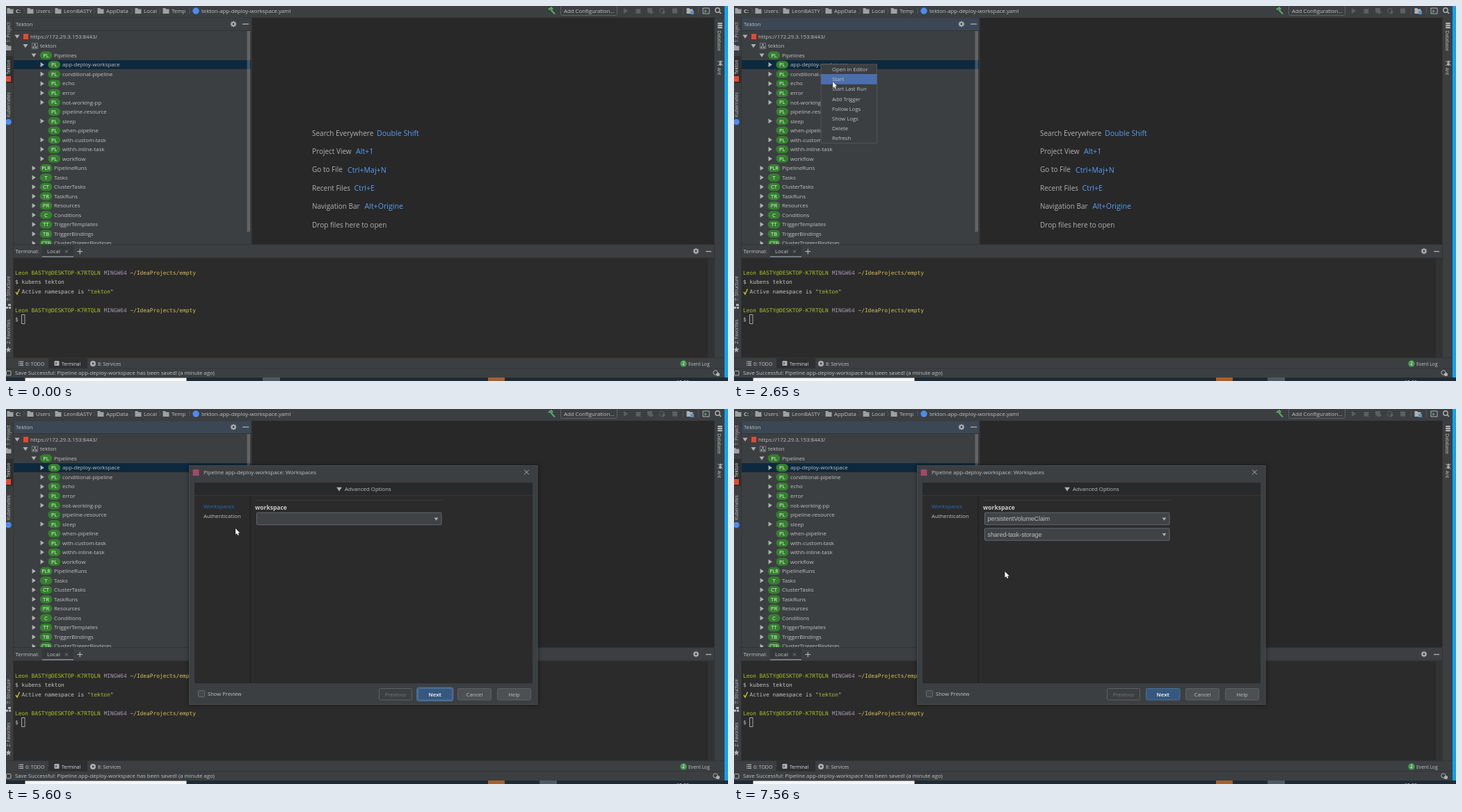
An HTML page with a canvas for the animation above (8 s loop, 1038 px wide and 540 px high).

```html
<!DOCTYPE html>
<html lang="en">
<head>
<meta charset="utf-8">
<title>Starting a pipeline with a workspace</title>
<style>
html, body { margin: 0; width: 100%; height: 100%; overflow: hidden; background: #282828; }
canvas { display: block; }
</style>
</head>
<body>
<canvas id="stage" width="1038" height="540"></canvas>
<script>
const g = document.getElementById('stage').getContext('2d');
const UI = '"Open Sans", "Noto Sans", sans-serif';
const ARIAL = '"Liberation Sans", Arial, sans-serif';
const MONO = '"DejaVu Sans Mono", monospace';
const PANEL = '#3c3f41', DARK = '#2b2b2b', FG = '#c0c0c0', ICON = '#afb1b3', DIM = '#5d6062';
const BLUE = '#4b6eaf', LINK = '#589df6', EDGE = '#323232';
const PROMPT_USER = 'Leon BASTY@DESKTOP-K7RTQLN';
const LOOP = 8000;

// ---- drawing helpers ----
function rect(x, y, w, h, fill, r = 0, stroke, lw = 1) {
  g.beginPath();
  g.roundRect(x, y, w, h, r);
  if (fill) { g.fillStyle = fill; g.fill(); }
  if (stroke) { g.strokeStyle = stroke; g.lineWidth = lw; g.stroke(); }
}
// y is the middle of the line of text
function text(s, x, y, color = FG, size = 7.85, font = UI, align = 'left', weight = '') {
  g.font = `${weight} ${size}px ${font}`;
  g.textAlign = align;
  g.fillStyle = color;
  g.fillText(s, x, y + size * 0.36);
}
function trace(points) {
  g.beginPath();
  for (let i = 0; i < points.length; i += 2) g.lineTo(points[i], points[i + 1]);
}
function line(points, color = ICON, width = 1) {
  trace(points);
  g.strokeStyle = color;
  g.lineWidth = width;
  g.stroke();
}
function poly(points, color = ICON) {
  trace(points);
  g.fillStyle = color;
  g.fill();
}
function disc(x, y, r, color) {
  g.beginPath();
  g.arc(x, y, r, 0, 7);
  g.fillStyle = color;
  g.fill();
}
function ring(x, y, r, color = ICON, width = 1) {
  g.beginPath();
  g.arc(x, y, r, 0, 7);
  g.strokeStyle = color;
  g.lineWidth = width;
  g.stroke();
}
function vertical(s, x, y, turn, color = FG) {
  g.save();
  g.translate(x, y);
  g.rotate(turn * Math.PI / 2);
  text(s, 0, 0, color, 6.7, UI, 'center');
  g.restore();
}
const down = (x, y, w = 3.5, color = ICON) => poly([x - w, y - w * 0.7, x + w, y - w * 0.7, x, y + w * 0.8], color);
const right = (x, y, w = 3.5, color = ICON) => poly([x - w * 0.7, y - w, x - w * 0.7, y + w, x + w * 0.8, y], color);
const folder = (x, y, color = '#9da2a6') => poly([x - 4.5, y - 4, x - 1, y - 4, x + 0.5, y - 2.5, x + 4.5, y - 2.5, x + 4.5, y + 4, x - 4.5, y + 4], color);
function gear(x, y) {
  for (let i = 0; i < 4; i++) {
    const c = Math.cos(i * Math.PI / 4) * 4.3, s = Math.sin(i * Math.PI / 4) * 4.3;
    line([x - c, y - s, x + c, y + s], ICON, 1.6);
  }
  disc(x, y, 3.2, ICON);
  disc(x, y, 1.4, PANEL);
}
function cross(x, y, r, color = ICON) {
  line([x - r, y - r, x + r, y + r], color);
  line([x - r, y + r, x + r, y - r], color);
}

// ---- window parts ----
function topBar() {
  rect(0, 0, 1033, 16.5, PANEL);
  folder(6, 7);
  text('C:', 14, 7, FG, 7.8, UI, 'left', 'bold');
  [[35, 43, 'Users'], [75, 83, 'LeonBASTY'], [136, 144, 'AppData'], [190, 198, 'Local'], [230, 238, 'Temp']]
    .forEach(([iconX, x, name]) => {
      line([iconX - 10, 3, iconX - 8, 7, iconX - 10, 11], '#55585a');
      folder(iconX, 7);
      text(name, x, 7);
    });
  line([263, 3, 265, 7, 263, 11], '#55585a');
  disc(273, 7, 4.7, '#4b8cf0');
  text('tekton-app-deploy-workspace.yaml', 281, 7);

  line([780, 5, 784, 2.5, 786, 5], '#59a869', 2.4);
  line([783, 5, 789, 11.5], '#59a869', 2);
  rect(797.5, -1, 81, 14.5, null, 2, '#5e6060');
  text('Add Configuration...', 802, 7);
  right(891, 7, 4, DIM);
  disc(909, 7.5, 3.4, DIM);
  line([905, 4, 913, 11], DIM);
  line([913, 4, 905, 11], DIM);
  poly([922, 3, 929, 3, 929, 8, 925.5, 11, 922, 8], DIM);
  right(929, 9, 3, DIM);
  ring(943, 7, 3.5, DIM);
  right(946, 9, 3, DIM);
  rect(958, 3.5, 7, 7, DIM);
  line([973.5, 2, 973.5, 12], '#515456');
  line([995.5, 2, 995.5, 12], '#515456');
  folder(983, 7, ICON);
  rect(984, 7, 5, 5, '#5a8fc0');
  rect(1002, 3, 9, 8, null, 0, ICON);
  right(1006, 7.5, 2.3, '#59a869');
  ring(1023, 6, 3.2, ICON, 1.4);
  line([1025.3, 8.3, 1028, 11], ICON, 1.6);
}

function sideBars() {
  rect(0, 17, 10, 490, PANEL);
  rect(0, 72, 10, 39, '#2d2f30');
  rect(10, 17, 1, 490, EDGE);
  vertical('1: Project', 4, 38, -1);
  folder(3, 60);
  vertical('Tekton', 4, 88, -1, '#dddddd');
  rect(0, 101, 7, 8, '#e2492f');
  vertical('Kubernetes', 4, 142, -1);
  disc(3.5, 167, 4.3, '#4b8cf0');
  vertical('7: Structure', 4, 407, -1);
  rect(3, 429, 4, 3, ICON);
  rect(0, 433, 3, 3, ICON);
  rect(4, 433, 3, 3, ICON);
  vertical('2: Favorites', 4, 469, -1);
  const star = [];
  for (let i = 0; i < 10; i++) {
    const a = i * Math.PI / 5 - Math.PI / 2, r = i % 2 ? 1.9 : 4.5;
    star.push(3.5 + r * Math.cos(a), 495 + r * Math.sin(a));
  }
  poly(star);

  rect(1018, 17, 15, 490, PANEL);
  rect(1018, 17, 1, 490, EDGE);
  for (let i = 0; i < 3; i++) rect(1023, 24 + i * 3, 7, 2.2, ICON, 1);
  vertical('Database', 1025, 50, 1);
  disc(1027, 80, 1.6, ICON);
  disc(1027, 84, 2, ICON);
  line([1023, 79, 1031, 86], ICON, 0.8);
  line([1031, 79, 1023, 86], ICON, 0.8);
  vertical('Ant', 1025, 94, 1);
}

const PIPELINES = ['app-deploy-workspace', 'conditional-pipeline', 'echo', 'error', 'not-working-pp', '-pipeline-resource',
  'sleep', '-when-pipeline', 'with-custom-task', 'withh-inline-task', 'workflow'];
const KINDS = ['PLR PipelineRuns', 'T Tasks', 'CT ClusterTasks', 'TR TaskRuns', 'PR Resources', 'C Conditions',
  'TT TriggerTemplates', 'TB TriggerBindings', 'CTB ClusterTriggerBindings'];
const rowY = i => 44 + 13.53 * i;

function badge(label, x, y) {
  rect(x - 8.8, y - 5.7, 17.6, 11.4, '#35802f', 5.7);
  text(label, x, y, '#f0f5ee', label.length > 2 ? 7.2 : 7.6, UI, 'center');
}

function tree(focused) {
  rect(11, 17, 342, 326, PANEL);
  rect(11, 17.5, 341, 18, focused ? '#3b4754' : PANEL);
  rect(11, 35, 341, 1, EDGE);
  text('Tekton', 14, 26.5);
  gear(327, 26);
  line([340, 26, 349, 26], ICON, 1.3);
  rect(11, 78, 341, 13, '#0d293e');

  g.save();
  g.beginPath();
  g.rect(11, 36, 341, 307);
  g.clip();
  down(16, rowY(0));
  rect(25, rowY(0) - 4, 7, 8, '#e2492f');
  text('https://172.29.3.153:8443/', 35, rowY(0));
  down(28, rowY(1));
  rect(37.5, rowY(1) - 4, 8, 8, null, 0, '#85898c', 0.8);
  disc(41.5, rowY(1) - 1.5, 1.3, ICON);
  disc(39.8, rowY(1) + 1.7, 1.2, ICON);
  disc(43.2, rowY(1) + 1.7, 1.2, ICON);
  text('tekton', 49, rowY(1));
  down(40, rowY(2));
  badge('PL', 57.5, rowY(2));
  text('Pipelines', 69, rowY(2));
  PIPELINES.forEach((name, i) => {
    const y = rowY(3 + i), leaf = name[0] === '-';
    if (!leaf) right(52, y);
    badge('PL', 69.3, y);
    text(leaf ? name.slice(1) : name, 81, y);
  });
  KINDS.forEach((kind, i) => {
    const y = rowY(14 + i), [short, name] = kind.split(' ');
    right(40, y);
    badge(short, 57.5, y);
    text(name, 69, y);
  });
  g.restore();
  rect(346.5, 36, 4.5, 289, 'rgba(166,166,166,.35)');
  rect(352.5, 17, 1.5, 326, EDGE);
}

function editor() {
  rect(354, 17, 664, 326, '#282828');
  [['Search Everywhere', 'Double Shift', 533], ['Project View', 'Alt+1', 503], ['Go to File', 'Ctrl+Maj+N', 491],
    ['Recent Files', 'Ctrl+E', 500.5], ['Navigation Bar', 'Alt+Origine', 515.5], ['Drop files here to open', '', 0]]
    .forEach(([label, keys, x], i) => {
      const y = 183 + i * 26.4;
      text(label, 440, y, '#b0b0b0', 10);
      text(keys, x, y, LINK, 10.6);
    });
}

function terminal() {
  rect(11, 343, 1007, 20, PANEL);
  rect(11, 343, 1007, 1, EDGE);
  text('Terminal:', 13.5, 353.5);
  rect(52, 345, 45, 16, '#35383a');
  text('Local', 59, 353.5);
  cross(87, 353.5, 2, '#7d8082');
  rect(52, 360, 45, 2, '#747a80');
  line([102.5, 353.5, 110, 353.5], ICON, 1.2);
  line([106.3, 349.7, 106.3, 357.3], ICON, 1.2);
  gear(992, 353);
  line([1006, 353.5, 1014, 353.5], ICON, 1.3);

  rect(11, 362.5, 1007, 144, DARK);
  rect(1009, 362.5, 9, 144, '#313335');
  const cell = 4.727, mono = (s, col, y, color = FG) => text(s, 13 + col * cell, y, color, 7.85, MONO);
  const prompt = y => {
    mono(PROMPT_USER, 0, y, '#a8c023');
    mono('MINGW64', 27, y, '#a396b0');
    mono('~/IdeaProjects/empty', 35, y, '#d6bf55');
  };
  prompt(384);
  mono('$ kubens tekton', 0, 397.5);
  line([14, 412, 16, 415, 19.5, 407.5], '#c5c52b', 1.4);
  mono('Active namespace is "', 2, 411);
  mono('tekton', 23, 411, '#a8c023');
  mono('"', 29, 411);
  prompt(438);
  mono('$', 0, 451.5);
  rect(22.5, 444.5, 4.5, 13, null, 0, '#a8a8a8');
}

function bottomBars(focused) {
  rect(0, 506.5, 1033, 29, PANEL);
  rect(0, 506, 1033, 0.8, EDGE);
  rect(0, 521.5, 1033, 0.8, EDGE);
  for (let i = 0; i < 3; i++) {
    rect(18, 511.5 + i * 2.6, 1.3, 1.3, ICON);
    rect(20, 511.5 + i * 2.6, 5, 1.3, ICON);
  }
  text('6: TODO', 28, 515.3, FG, 7);
  rect(61, 507, 56, 14.5, '#2d2f30');
  rect(69.5, 511, 7, 7, ICON, 1);
  line([71, 513, 73, 514.5, 71, 516], '#2d2f30');
  text('Terminal', 80, 515.3, '#dddddd', 6.7);
  disc(125, 515, 4, ICON);
  right(125.5, 515, 2, PANEL);
  text('8: Services', 132, 515.3, FG, 6.8);
  disc(974, 515, 4.7, '#499c54');
  text('2', 974, 515, '#ffffff', 6.2, UI, 'center');
  text('Event Log', 981, 515.3, FG, 6.8);
  rect(0.5, 525.5, 6.5, 6.5, null, 1, ICON);
  text('Save Successful: Pipeline app-deploy-workspace has been saved! (a minute ago)', 13, 528.5, FG, 7.75);
  ring(1020, 528, 3.2);
  disc(1023.5, 530.5, 2.6, ICON);

  rect(0, 535, 1038, 5, '#1d2b35');
  rect(27.5, 535.5, 232, 5, '#f7f7f7');
  rect(focused ? 767 : 369, 535, 25, 5, '#4c5a64');
  rect(693, 535, 24, 5, '#a5602f');
  text('15:30', 973, 541.5, '#d8dde0', 7, UI, 'center');
  rect(1033, 0, 5, 535, '#0ea3f2');
}

function contextMenu(row) {
  rect(125, 84, 80.5, 113.5, PANEL, 0, '#515355');
  if (row >= 0) rect(125, 98 + (row - 1) * 14.2, 80.5, 14.8, BLUE);
  ['Open in Editor', 'Start', 'Start Last Run', 'Add Trigger', 'Follow Logs', 'Show Logs', 'Delete', 'Refresh']
    .forEach((item, i) => text(item, 141, 91.3 + i * 14.2, FG, 7.65));
}

function button(label, x, w, kind) {
  const primary = kind === 'primary' || kind === 'focused', off = kind === 'off';
  if (kind === 'focused') rect(x - 1, 401.5, w + 2, 18.5, null, 3, '#466d94', 2);
  rect(x + 0.5, 402.5, w - 1, 16.5, primary ? '#365880' : off ? PANEL : '#4c5052', 2, primary ? '#4c708c' : '#5e6060');
  text(label, x + w / 2, 411, off ? '#777777' : primary ? '#e0e0e0' : FG, 7.7, UI, 'center', primary ? 'bold' : '');
}

function combo(y, value, focused) {
  if (focused) rect(359, y - 10, 268, 20, null, 2, '#3d6fa5', 2);
  rect(360.5, y - 8.7, 265.5, 17.4, '#3f4345', 1, focused ? '#466d94' : '#646769');
  text(value, 364.5, y, FG, 8.75, ARIAL);
  down(618.5, y + 0.5, 2.8);
}

function dialog(picking, chosen, row) {
  g.save();
  g.shadowColor = 'rgba(0,0,0,.45)';
  g.shadowBlur = 6;
  rect(263, 81, 501.5, 345, PANEL);
  g.restore();
  rect(263.5, 81.5, 500.5, 344, null, 0, '#4a4d4f', 0.8);
  rect(268.5, 87, 9, 9, '#a04a6a');
  text('Pipeline app-deploy-workspace: Workspaces', 284, 91);
  cross(748.5, 91, 3.3);
  rect(271, 106, 486, 289, DARK);
  rect(271, 106, 486, 18, '#27292a');
  rect(271, 124, 486, 0.8, '#3a3c3d');
  down(479, 115.5, 3.8);
  text('Advanced Options', 487, 115.5);
  rect(350.5, 125, 1, 270, '#1d1e1f');
  text('Workspaces', 284, 140.5, '#2470c4');
  text('Authentication', 284, 154.5);
  rect(358, 131, 270, 0.8, '#3d4041');
  text('workspace', 358, 142, '#cccccc', 8.5, UI, 'left', 'bold');
  combo(158, chosen ? 'persistentVolumeClaim' : '', picking);
  if (chosen) combo(180.5, 'shared-task-storage');
  rect(276.5, 405.5, 9, 9, '#43494a', 1, '#6b6b6b');
  text('Show Preview', 290, 410.5, FG, 7.6);
  button('Previous', 536, 48, 'off');
  button('Next', 592, 49.5, picking || chosen ? 'primary' : 'focused');
  button('Cancel', 649, 49, '');
  button('Help', 706, 49, '');
  if (picking) {
    rect(358.5, 169.5, 269, 78, PANEL, 0, '#515355');
    rect(359, 170 + row * 15.55, 268.5, 15.5, BLUE);
    ['', 'emptyDir', 'configMap', 'secret', 'persistentVolumeClaim']
      .forEach((item, i) => text(item, 364.5, 178.2 + i * 15.55, FG, 8.75, ARIAL));
  }
}

// ---- pointer: [first step, last step, number of steps, x, y] ----
const MOVES = [
  [170, 170, 1, 905, 497], [250, 970, 10, 114, 91], [1030, 1030, 1, 97, 75], [1180, 1570, 6, 123.5, 84],
  [2570, 2650, 2, 142, 109], [2730, 2730, 1, 146, 120], [2880, 3180, 5, 158, 107], [3970, 4510, 8, 498, 164.5],
  [5050, 5600, 8, 330, 172], [5680, 5840, 3, 367, 155], [5940, 6010, 2, 371, 154.5],
  [6540, 6540, 1, 371, 153.5], [6850, 7080, 4, 389.5, 234]
];
const CLICKS = [[1950, 2110], [3260, 3340], [6180, 6240], [7400, 7560]];

function pointerAt(t) {
  let x = 905, y = 497;
  for (const [start, end, steps, toX, toY] of MOVES) {
    if (t < start) break;
    const gap = (end - start) / (steps - 1 || 1) || 1;
    const p = Math.min(steps, Math.floor((t - start) / gap + 1e-6) + 1) / steps;
    const e = p * p * (3 - 2 * p);
    x += (toX - x) * e;
    y += (toY - y) * e;
  }
  return [x, y];
}

function pointer(x, y, pressed) {
  if (pressed) disc(x, y, 8.5, 'rgba(205,192,15,.82)');
  const shape = [0, 0, 0, 8.8, 2, 7, 3.3, 10, 4.8, 9.3, 3.5, 6.5, 6.3, 6.4].map((v, i) => v + (i % 2 ? y : x));
  trace(shape);
  g.closePath();
  g.strokeStyle = '#1a1a1a';
  g.lineWidth = 0.9;
  g.stroke();
  poly(shape, '#ffffff');
}

function draw(t) {
  const [x, y] = pointerAt(t);
  const focused = t >= 2020;
  editor();
  topBar();
  tree(focused);
  terminal();
  sideBars();
  bottomBars(focused);
  if (t >= 2190 && t < 3510) contextMenu(x > 126 ? Math.floor((y - 84) / 14.2) : -1);
  if (t >= 4050) dialog(t >= 6180 && t < 7560, t >= 7560, Math.max(0, Math.floor((y - 170) / 15.55)));
  if (t >= 170) pointer(x, y, CLICKS.some(([on, off]) => t >= on && t < off));
}

function tick() {
  draw(performance.now() % LOOP);
  requestAnimationFrame(tick);
}
tick();
</script>
</body>
</html>
```
